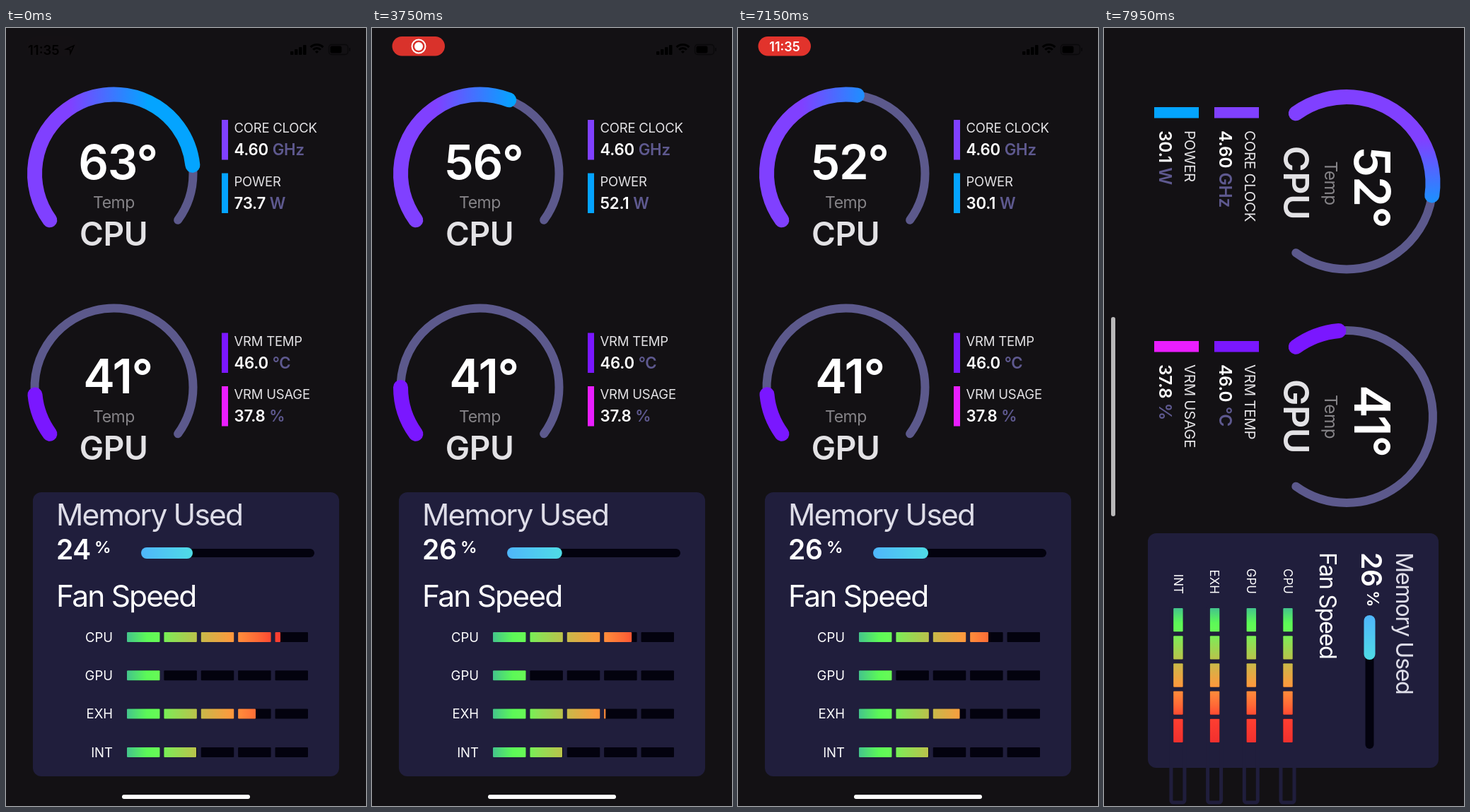
These frames come from a looping animation (509 px wide and 1101 px high, 8000 ms). An HTML page with a canvas:

```html
<!DOCTYPE html>
<html lang="en">
<head>
<meta charset="utf-8">
<title>Hardware monitor</title>
<style>
html, body { margin: 0; width: 100%; height: 100%; overflow: hidden; background: #000; }
canvas { display: block; width: 509px; height: 1101px; }
</style>
</head>
<body>
<canvas id="stage" width="509" height="1101"></canvas>
<script>
const ctx = document.getElementById('stage').getContext('2d');
const LOOP = 8000, TURN = 7300, TURN_TIME = 427.5;
const BG = '#131114', PANEL = '#201e3c', TRACK = '#5c598c', SLOT = '#03020e', UNIT = '#5e598f';
const SOFT = '#e3e2e5';

// Readings over time
const TIMES = [0, 1300, 2850, 4800, 7150];
const CPU_ARC = [210, 183.3, 162.3, 130.4, 134.2];
const GPU_ARC = [30.6, 38.3, 28, 45.4, 30.8];
const MEMORY = [73, 75.5, 77.5, 78, 78];
const CPU_FAN = [217, 216, 204, 187, 183];
const EXH_FAN = [182, 182, 169, 148, 142.5];
const CPU_TEMP = [63, 59, 56, 57, 52];
const POWER = ['73.7', '73.5', '52.1', '42.1', '30.1'];
const USED = [24, 25, 26, 26, 26];

let time = 0, turn = 0, wide = false;

const clamp = x => Math.max(0, Math.min(1, x));
const mix = (a, b) => a + (b - a) * turn;   // places glide while the screen turns
const pick = (a, b) => wide ? b : a;        // sizes switch at once
// A point kept at a size-dependent offset from its gliding anchor
const place = (a, b, offA, offB) => mix(a - offA, b - offB) + pick(offA, offB);

function follow(values) {
  let i = 0;
  while (i < TIMES.length - 2 && time > TIMES[i + 1]) i++;
  const f = clamp((time - TIMES[i]) / (TIMES[i + 1] - TIMES[i]));
  return values[i] + (values[i + 1] - values[i]) * f;
}

function latest(values) {
  let i = 0;
  while (i < TIMES.length - 1 && time > (TIMES[i] + TIMES[i + 1]) / 2) i++;
  return values[i];
}

function text(str, x, y, size, color, weight = 400, align = 'left', spacing = 0) {
  ctx.font = `${weight} ${size}px Inter, Roboto, sans-serif`;
  ctx.letterSpacing = size * spacing + 'px';
  ctx.textAlign = align;
  ctx.fillStyle = color;
  ctx.fillText(str, x, y);
  return ctx.measureText(str).width;
}

function box(x, y, w, h, r, color) {
  ctx.fillStyle = color;
  ctx.beginPath();
  ctx.roundRect(x, y, w, h, r);
  ctx.fill();
}

function ramp(x0, x1, stops) {
  const g = ctx.createLinearGradient(x0, 0, x1, 0);
  stops.forEach(([at, color]) => g.addColorStop(at, color));
  return g;
}

function arc(x, y, r, sweep, width, color) {
  const start = 144 * Math.PI / 180;
  ctx.beginPath();
  ctx.arc(x, y, r, start, start + sweep * Math.PI / 180);
  ctx.lineWidth = width;
  ctx.lineCap = 'round';
  ctx.strokeStyle = color;
  ctx.stroke();
}

function gauge(name, temp, sweep, tallY, wideX, color) {
  const r = pick(112, 122);
  const x = place(152.5, wideX, 112, 122), y = place(tallY, 166, 112, 122);
  arc(x, y, r, 252, 12, TRACK);
  arc(x, y, r, sweep, 21, color || ramp(x - 62, x + 48, [[0, '#8040ff'], [1, '#04a4ff']]));
  text(temp + '°', place(158, wideX + 6, 51, 55), place(tallY + 8, 155, 49, 51),
    pick(67, 70), '#fff', 600, 'center', -0.02);
  text('Temp', place(152.5, wideX, 30, 32), place(tallY + 49, 197, 17, 18),
    pick(23, 24.3), '#858387', 400, 'center', -0.02);
  text(name, place(152, wideX - 0.5, 47, 51), place(tallY + 102, 255, 33, 36),
    pick(46, 50), SOFT, 600, 'center', -0.01);
}

function stat(label, value, unit, color, tallY, wideX, wideY) {
  // The whole group glides by its centre
  const x = place(305, wideX, -67, -81), y = place(tallY, wideY, -28, -31);
  box(x, y, pick(9, 15.5), pick(56.5, 63), 0, color);
  const tx = x + pick(17.5, 33), size = pick(22.2, 24.4);
  text(label, tx, y + pick(18, 20), pick(18.5, 20.4), SOFT, 400, 'left', -0.012);
  const w = text(value, tx, y + pick(50, 56), size, '#fff', 600, 'left', -0.01);
  text(unit, tx + w + size * 0.26, y + pick(50, 56), size, UNIT, 600, 'left', -0.01);
}

function fan(name, fill, row) {
  const x = mix(171, 821), y = mix(862 + row * 54.3, 249 + row * 51.7);
  const full = pick(256, 190), seg = pick(46.5, 33.3), step = (full - seg) / 4, h = pick(14, 13.5);
  const level = full * Math.min(1, fill / 256 + (1.38 - fill / 256) * turn);
  if (wide) {
    ctx.strokeStyle = PANEL;
    ctx.lineWidth = 5;
    ctx.beginPath();
    ctx.roundRect(x - 2.5, y - 9, mix(437, 1098.5) - x, 19, 3);
    ctx.stroke();
  }
  const paint = ramp(x, x + full, [
    [0, '#44c48c'], [0.11, '#5cf957'], [0.18, '#68f956'], [0.24, '#88e455'], [0.38, '#b9c34b'],
    [0.43, '#cfb548'], [0.58, '#ff993d'], [0.72, '#ff6a36'], [0.82, '#ff3f31'], [1, '#f2302e']]);
  for (let i = 0; i < 5; i++) {
    const sx = x + i * step;
    box(sx, y - h / 2, seg, h, 1, SLOT);
    const w = Math.min(seg, level - i * step);
    if (w > 0) box(sx, y - h / 2, w, h, 1, paint);
  }
  const size = pick(18.5, 17);
  text(name, x - 20, y + size * 0.365, size, '#fff', 400, 'right');
}

function panel() {
  box(mix(38, 715), mix(657, 36), mix(433, 332), mix(402, 411), 12, PANEL);
  const tx = mix(71, 742), head = pick(42.5, 32.4);
  text('Memory Used', place(71, 742, -131, -100), place(704, 96, 16, 12),
    head, '#dedde8', 400, 'left', -0.043);
  text(latest(USED), tx, mix(752, 145), 39, '#fff', 600, 'left', -0.01);
  text('%', tx + 54, mix(743, 137), 23.5, '#fff', 600);
  const bx = mix(191, 831), by = mix(743, 133.5), bw = pick(245, 189);
  box(bx, by - 6, bw, 12, 6, SLOT);
  const fw = pick(follow(MEMORY), 63);
  box(bx, by - 8, fw, 16, 8, ramp(bx, bx + fw, [[0, '#4fb6fb'], [1, '#4fdce6']]));
  text('Fan Speed', place(71, 742, -99, -75), place(819, 204, 16, 12),
    head, '#fff', 400, 'left', -0.043);
  fan('CPU', follow(CPU_FAN), 0);
  fan('GPU', 46.5, 1);
  fan('EXH', follow(EXH_FAN), 2);
  fan('INT', 98, 3);
}

function statusBar() {
  for (let i = 0; i < 4; i++) box(402 + i * 6, 33 - i * 3, 4.5, 5 + i * 3, 1, '#000');
  // Wi-Fi fan
  ctx.strokeStyle = '#000';
  ctx.lineCap = 'butt';
  ctx.lineWidth = 3;
  for (const r of [12.5, 7.5, 2]) {
    ctx.beginPath();
    ctx.arc(439.5, 36, r, -Math.PI * 0.75, -Math.PI * 0.25);
    ctx.stroke();
  }
  // Battery
  ctx.strokeStyle = '#0a090b';
  ctx.lineWidth = 1.3;
  ctx.beginPath();
  ctx.roundRect(456.5, 23.5, 27, 14, 4);
  ctx.stroke();
  box(458.5, 25.5, 16, 10, 2, '#000');
  box(485, 28, 2, 5, 1, '#0a090b');

  const shown = clamp(time / 300);
  if (shown < 1) {
    text('11:35', 31, 38, 18.5, '#000', 600);
    ctx.lineWidth = 1.6;
    ctx.strokeStyle = '#000';
    ctx.beginPath();
    ctx.moveTo(96, 25);
    ctx.lineTo(85, 30);
    ctx.lineTo(90.5, 30.5);
    ctx.lineTo(91, 36);
    ctx.closePath();
    ctx.stroke();
  }
  const base = ctx.globalAlpha;
  ctx.globalAlpha = base * shown * (0.96 + 0.03 * Math.cos((time - 1300) / 500 * Math.PI));
  box(28.5, 12, 74.5, 27.5, 13.75, '#e8352e');
  ctx.globalAlpha = base * shown;
  if (time < 3800) {
    ctx.strokeStyle = '#fff';
    ctx.lineWidth = 2;
    ctx.beginPath();
    ctx.arc(66, 26, 9.5, 0, 7);
    ctx.stroke();
    box(60, 20, 12, 12, 6, '#fff');
  } else {
    text('11:35', 66, 33, 18, '#fff', 600, 'center');
  }
  ctx.globalAlpha = base;
}

function draw() {
  const s = clamp((time - TURN) / TURN_TIME);
  turn = s * s * (3 - 2 * s);
  wide = time > TURN;
  const w = mix(509, 1101), h = mix(1101, 509);

  ctx.setTransform(1, 0, 0, 1, 0, 0);
  ctx.fillStyle = '#000';
  ctx.fillRect(0, 0, 509, 1101);
  ctx.translate(254.5, 550.5);
  ctx.rotate(turn * Math.PI / 2);
  ctx.translate(-w / 2, -h / 2);
  box(0, 0, w, h, 0, BG);

  gauge('CPU', latest(CPU_TEMP), follow(CPU_ARC), 206, 219.5);
  gauge('GPU', 41, follow(GPU_ARC), 508.5, 550, '#7a17ff');
  stat('CORE CLOCK', '4.60', 'GHz', '#8040ff', 130, 112, 290);
  stat('POWER', latest(POWER), 'W', '#04a4ff', 205.5, 112, 375);
  stat('VRM TEMP', '46.0', '°C', '#7a17ff', 431.5, 443, 290);
  stat('VRM USAGE', '37.8', '%', '#e91eff', 507, 443, 375);
  panel();

  // System overlays fade out before the turn and back in after it
  ctx.globalAlpha = clamp(1 - (time - TURN) / 80);
  if (ctx.globalAlpha > 0) {
    statusBar();
    box(164, 1085, 181, 6, 3, '#fff');
  }
  ctx.globalAlpha = clamp((time - 7720) / 330);
  box(409, 493, 282, 6, 3, '#fff');
  ctx.globalAlpha = 1;
}

const begin = performance.now();
function tick() {
  time = (performance.now() - begin) % LOOP;
  draw();
  requestAnimationFrame(tick);
}
tick();
</script>
</body>
</html>
```
